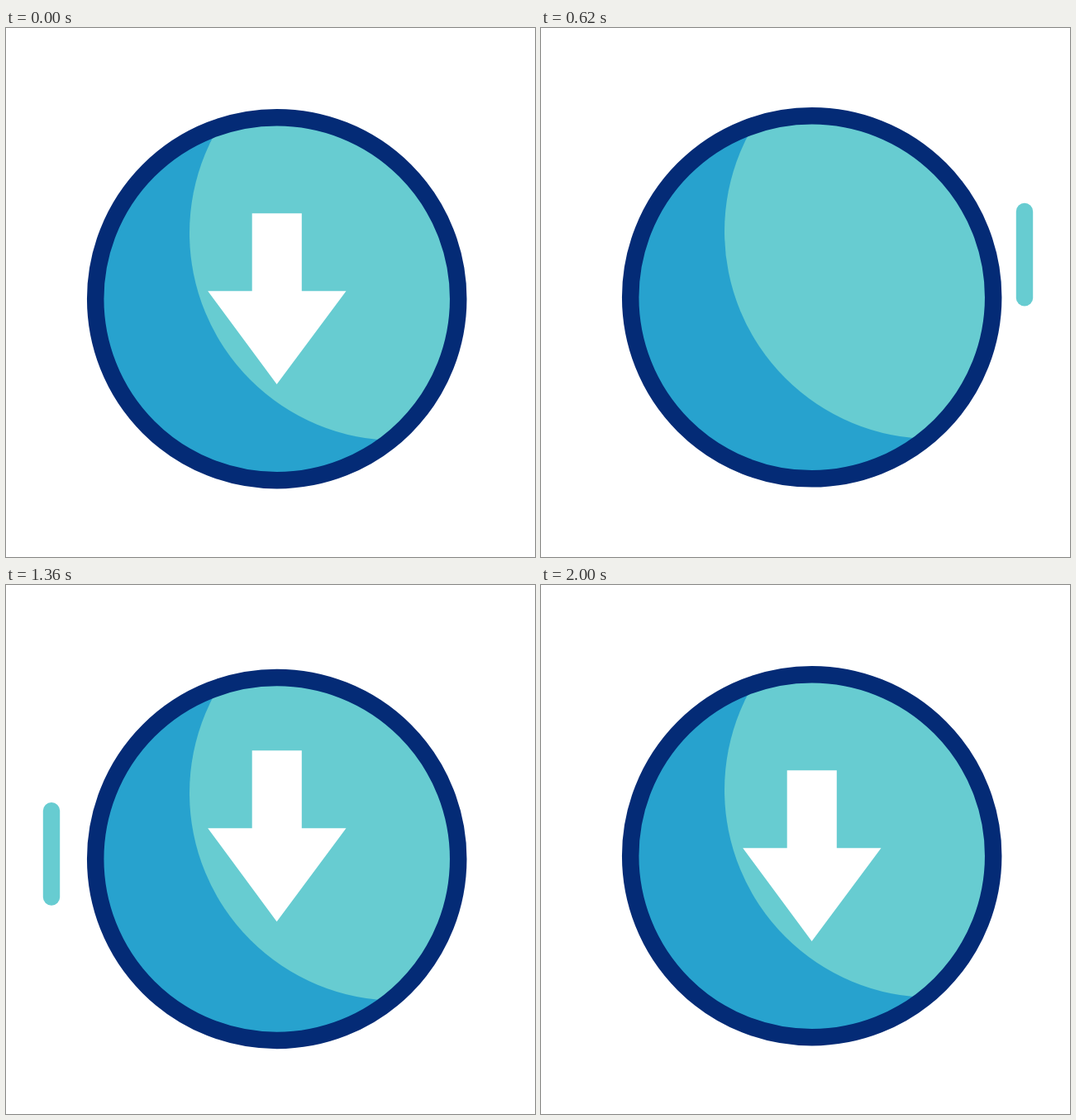
Animation of 640x640 px, one loop 2120 ms. Source, as an HTML page:

```html
<!DOCTYPE html>
<html lang="en">
<head>
<meta charset="utf-8">
<title>Download button</title>
<style>
  html, body { margin: 0; width: 100%; height: 100%; overflow: hidden; background: #fff; }
  svg { display: block; width: 100%; height: 100%; }
</style>
</head>
<body>
<svg viewBox="0 0 640 640">
  <defs>
    <clipPath id="disc"><circle cx="327.7" cy="327.7" r="214"/></clipPath>
  </defs>
  <g stroke="#67ccd1" stroke-width="20.4" stroke-linecap="round">
    <line id="left" x1="55" x2="55"/>
    <line id="right" x1="585" x2="585"/>
  </g>
  <g id="ball">
    <g clip-path="url(#disc)">
      <circle cx="327.7" cy="327.7" r="214" fill="#27a2ce"/>
      <circle cx="473" cy="248" r="251" fill="#67ccd1"/>
      <path id="arrow" fill="#fff" d="M297.7 224.2H357.8V318.2H411.5L327.6 431L244.2 318.2H297.7Z"/>
    </g>
    <circle cx="327.7" cy="327.7" r="219.5" fill="none" stroke="#042b76" stroke-width="20.5"/>
  </g>
</svg>
<script>
  const LOOP = 2120, END = 2000, STEP = 20;
  const LINE_TOP = 121.5, LINE_LENGTH = 356.5;
  const part = id => document.getElementById(id);
  const ball = part('ball'), arrow = part('arrow');
  const streaks = [
    { line: part('left'), starts: [0, 1100] },
    { line: part('right'), starts: [400, 1500] }
  ];

  // Keys are [time, value] pairs.
  const bob = [[0, 0], [400, 12.8], [800, -12.8], [1200, 12.8], [1600, -12.8], [2000, 0]];
  const exit = [[0, 0], [600, 340]];
  const entry = [[900, -338], [1500, 22], [1600, 0]];

  function ease(t, from, to) {
    const p = Math.min(1, Math.max(0, (t - from) / (to - from)));
    return p * p * (3 - 2 * p);
  }

  function track(keys, t) {
    return keys.slice(1).reduce((value, [time, next], i) =>
      value + (next - keys[i][1]) * ease(t, keys[i][0], time), keys[0][1]);
  }

  function shift(node, y) {
    node.setAttribute('transform', `translate(0 ${y.toFixed(3)})`);
  }

  function drawStreak({ line, starts }, t) {
    const start = starts.find(s => t > s && t < s + 480);
    line.style.display = start === undefined ? 'none' : '';
    if (start === undefined) return;
    line.setAttribute('y1', LINE_TOP + LINE_LENGTH * ease(t, start + 80, start + 480));
    line.setAttribute('y2', LINE_TOP + LINE_LENGTH * ease(t, start, start + 400));
  }

  function draw(t) {
    shift(ball, track(bob, t));
    shift(arrow, track(t < 750 ? exit : entry, t));
    streaks.forEach(streak => drawStreak(streak, t));
  }

  let origin;
  function tick(now) {
    origin ??= now;
    const t = Math.max(0, now - origin) % LOOP;
    draw(Math.min(END, Math.floor((t + 0.01) / STEP) * STEP));
    requestAnimationFrame(tick);
  }

  draw(0);
  requestAnimationFrame(tick);
</script>
</body>
</html>
```
